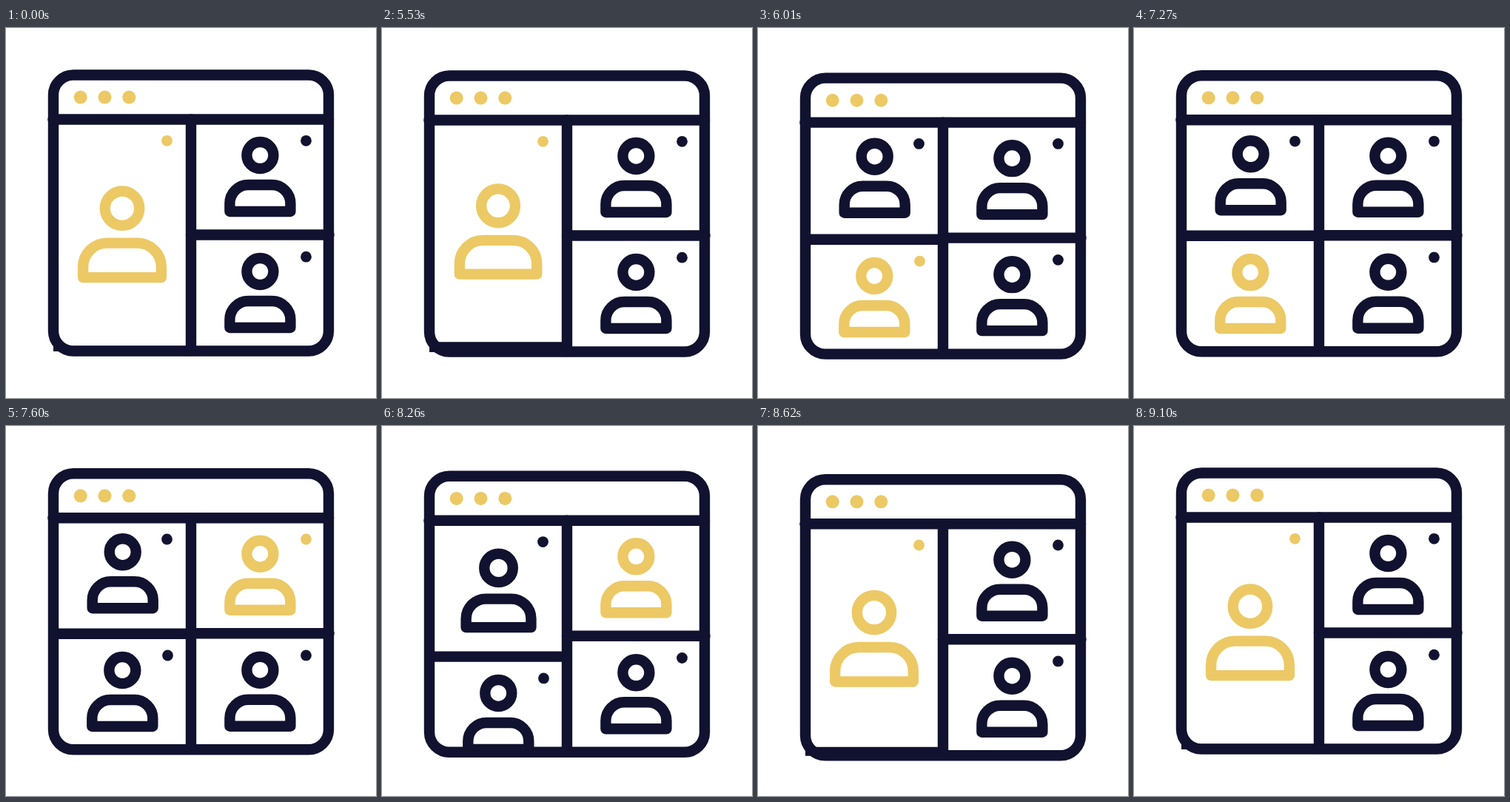
These frames come from a looping animation (500x500 px, 9130 ms). An HTML page with a canvas:

```html
<!DOCTYPE html>
<html lang="en">
<head>
<meta charset="utf-8">
<style>
  html, body { margin: 0; width: 100%; height: 100%; overflow: hidden; background: #fff; }
  canvas { display: block; }
</style>
</head>
<body>
<canvas width="500" height="500"></canvas>
<script>
const ctx = document.querySelector('canvas').getContext('2d');
const DARK = '#11122f', GOLD = '#ecc965';
const LOOP = 9130, SPLIT = 5480, MERGE = 8150;

// Who speaks from which time on, and when the speaker's dot is hidden
const turns = [[0, 'topLeft'], [5700, 'bottomLeft'], [7435, 'topRight'], [8290, 'topLeft']];
const hidden = [[6640, 6820], [7120, 7435], [7810, 8020], [8200, 8560]];

const lerp = (a, b, p) => a + (b - a) * p;
const clamp = x => Math.min(1, Math.max(0, x));

// Soft start, quick middle, long tail
function ease(t, duration) {
  const u = clamp(t / duration);
  return 1 - (1 - u * u * (3 - 2 * u)) ** 4;
}

const bump = (t, duration, height) => height * Math.sin(Math.PI * clamp(t / duration)) ** 2;

function line(x1, y1, x2, y2) {
  ctx.beginPath();
  ctx.moveTo(x1, y1);
  ctx.lineTo(x2, y2);
  ctx.stroke();
}

function dot(x, y, r) {
  ctx.beginPath();
  ctx.arc(x, y, r, 0, 7);
  ctx.fill();
}

function setColor(color) {
  ctx.fillStyle = ctx.strokeStyle = color;
}

function person(x, y, scale = 1) {
  ctx.beginPath();
  ctx.arc(x, y, 18 * scale, 0, 7);
  ctx.stroke();
  const half = 41 * scale, r = 25 * scale;
  const top = y + 40 + 24 * (scale - 1), bottom = top + 36 * scale;
  ctx.beginPath();
  ctx.moveTo(x - half, bottom);
  ctx.arcTo(x - half, top, x, top, r);
  ctx.arcTo(x + half, top, x + half, bottom, r);
  ctx.lineTo(x + half, bottom);
  ctx.closePath();
  ctx.stroke();
}

function draw(t) {
  const speaker = turns.findLast(([from]) => t >= from)[1];
  const dotHidden = hidden.some(([from, to]) => t >= from && t < to);
  const progress = duration => ease(t - SPLIT, duration) - ease(t - MERGE, duration);
  const shrink = progress(700);
  const slide = 157 * (1 - progress(850));

  function participant(name, x, y, scale, dotX, dotY) {
    setColor(name === speaker ? GOLD : DARK);
    person(x, y, scale);
    if (name !== speaker || !dotHidden) dot(dotX, dotY, 7.4);
  }

  ctx.clearRect(0, 0, 500, 500);
  ctx.save();
  ctx.translate(0, bump(t - SPLIT, 640, 16) + bump(t - 7210, 450, 4.5) + bump(t - MERGE, 640, 16));
  ctx.lineWidth = 14.4;
  ctx.lineCap = ctx.lineJoin = 'round';

  ctx.save();
  ctx.beginPath();
  ctx.rect(64, 124, 186, 313);
  ctx.clip();
  participant('bottomLeft', 157.3, 329.3 + slide, 1, 218.5, 309.3 + slide);
  setColor(DARK);
  line(64, 280 + slide, 250, 280 + slide);
  ctx.restore();

  participant('topLeft', lerp(157, 157.7, shrink), lerp(243.7, 169.5, shrink),
    lerp(1.29, 1, shrink), 217.5, 152.3);
  participant('topRight', 343.4, 172, 1, 405.5, 152.3);
  participant('bottomRight', 343.4, 329, 1, 405.5, 309.2);

  setColor(DARK);
  ctx.beginPath();
  ctx.roundRect(64, 63.5, 372, 373, 27);
  ctx.stroke();
  line(63.5, 123.5, 436, 123.5);
  line(250, 123.5, 250, 436);
  line(250, 279.5, 436.5, 279.5);

  setColor(GOLD);
  for (const x of [100.7, 133.5, 166.3]) dot(x, 93.6, 9);
  ctx.restore();
}

const start = performance.now();
function frame() {
  draw((performance.now() - start) % LOOP);
  requestAnimationFrame(frame);
}
frame();
</script>
</body>
</html>
```
